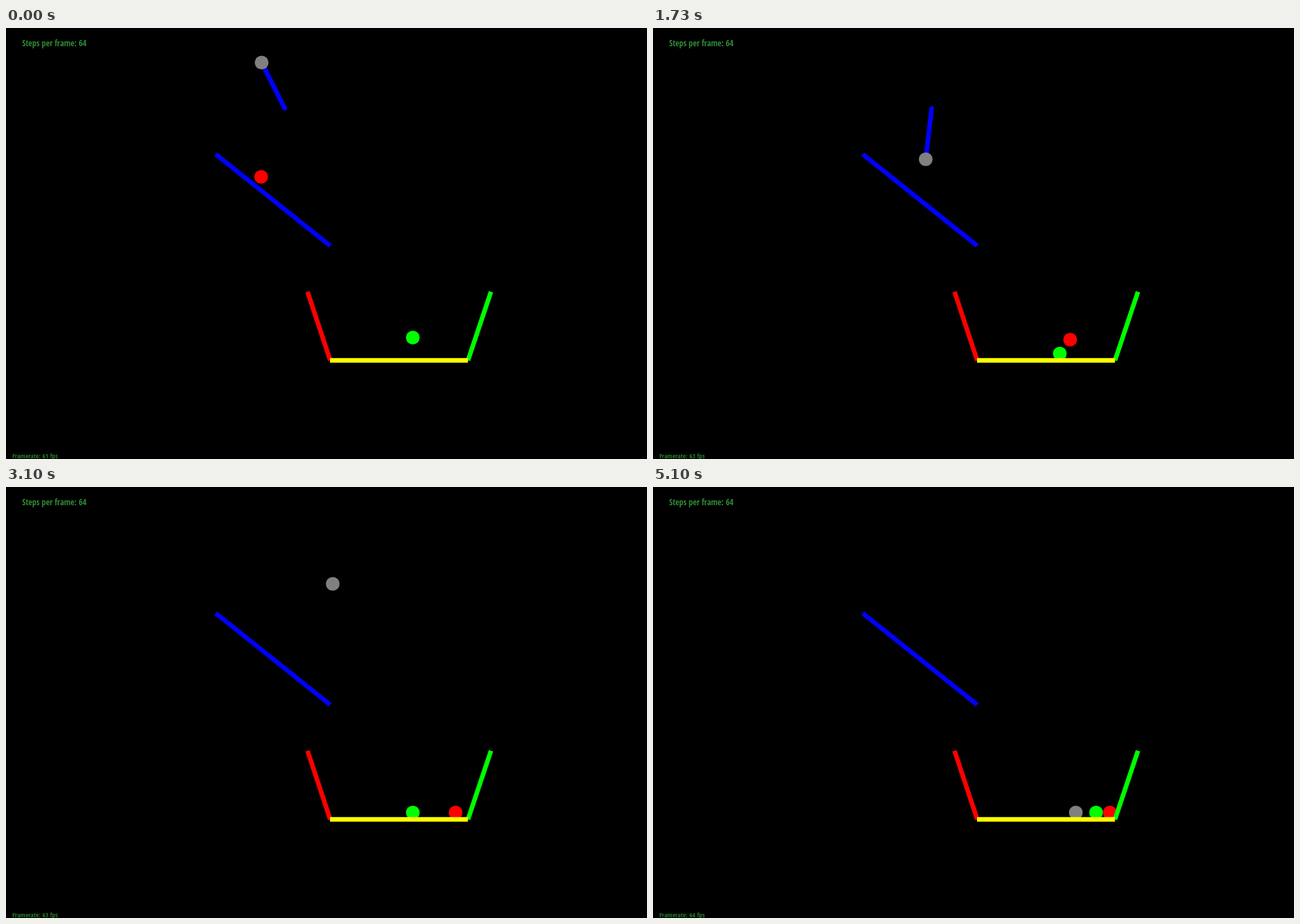
These frames come from a looping animation (912x614 px, 5130 ms). An HTML page:

```html
<!DOCTYPE html>
<html lang="en">
<head>
<meta charset="utf-8">
<title>Ball physics</title>
<style>
  html, body { margin: 0; width: 100%; height: 100%; overflow: hidden; background: #000; }
  svg { display: block; width: 912px; height: 614px; }
  line { stroke-width: 6.5; }
  text {
    font-family: "Open Sans Condensed", "Open Sans", "Noto Sans", sans-serif;
    font-stretch: 75%;
    font-weight: 700;
    fill: #2f8a35;
  }
  #steps { font-size: 12px; }
  #rate { font-size: 9.4px; fill: #2a7a2f; }
</style>
</head>
<body>
<svg viewBox="0 0 912 614">
  <rect width="912" height="614"/>
  <line id="rod" x1="396.5" y1="114.5" stroke="#00f" stroke-linecap="round"/>
  <circle id="gray" r="9.8" fill="#808080"/>
  <circle id="red" r="9.8" fill="#f00"/>
  <circle id="green" r="9.8" fill="#0f0"/>
  <line x1="298.3" y1="179.8" x2="461.3" y2="310.2" stroke="#00f"/>
  <line x1="429" y1="375.8" x2="461.3" y2="473.5" stroke="#f00"/>
  <line x1="657.3" y1="473.5" x2="690" y2="375.8" stroke="#0f0"/>
  <line x1="461" y1="473.5" x2="657.3" y2="473.5" stroke="#ff0"/>
  <text id="steps" x="23" y="26">Steps per frame: 64</text>
  <text id="rate" x="9" y="613">Framerate: 61 fps</text>
</svg>
<script>
const LOOP = 5130, FRAMES = 154;
const FLOOR = 463.7, DIAMETER = 19.6, GRAVITY = 320;
const PIVOT = [396.5, 114.5], ROD = 73, CUT = 2.9, HIT = 4.607;
const COS = 0.781, SIN = 0.625; // ramp direction

const $ = id => document.getElementById(id);

// time, angle from straight up, angular speed
const swing = [
  [0, 0.466, 0], [0.535, 0.675, 0.8], [1.07, 1.319, 1.7],
  [1.73, 3.025, 3.05], [2.53, 4.651, 0.25], [2.64, 4.668, 0], [CUT, 4.525, -0.9]
];

// time, frames per second
const rates = [[0, 61], [0.3, 62], [0.8, 63], [1.9, 62], [2.95, 63], [3.5, 61], [4.4, 64]];

const fly = (t, x, y, vx, vy) => [x + vx * t, y + vy * t + GRAVITY / 2 * t * t];
const slide = (s, x, y) => [x + COS * s, y + SIN * s];

function swingAngle(t) {
  let i = 1;
  while (i < swing.length - 1 && t > swing[i][0]) i++;
  const [t0, a, va] = swing[i - 1], [t1, b, vb] = swing[i];
  const h = t1 - t0, u = (t - t0) / h, w = 1 - u;
  return a * w * w * (1 + 2 * u) + b * u * u * (3 - 2 * u) + h * u * w * (va * w - vb * u);
}

function greenAt(t) {
  if (t < HIT) return [578.8, Math.min(FLOOR, 441 + GRAVITY / 2 * t * t)];
  const u = t - HIT;
  const x = u < 0.24 ? 578.8 + 170 * u : Math.min(630.4, 619.6 + 75 * (u - 0.24));
  return [x, FLOOR];
}

function redAt(t, green) {
  if (t < 1.157) {
    const drop = Math.min(5.8, 125 * t * t);
    return slide(103 * t * t, 363 - SIN * drop, 212 + COS * drop);
  }
  if (t < 1.787) return fly(t - 1.157, 467.1, 302.5, 220.6, 155.3);
  if (t < 2) return [606 + 206.6 * (t - 1.787), FLOOR];
  if (t < 2.38) {
    // short climb up the leaning wall
    const u = t - 2, d = 59 * u - 155 * u * u;
    return [650 + 0.316 * d, FLOOR - 0.949 * d];
  }
  return [Math.max(639 + 11 * Math.exp(-4 * (t - 2.38)), green[0] + DIAMETER), FLOOR];
}

function grayAt(t, green) {
  if (t < CUT) {
    const a = swingAngle(t);
    return [PIVOT[0] - ROD * Math.sin(a), PIVOT[1] - ROD * Math.cos(a)];
  }
  if (t < 3.853) return fly(t - CUT, 468.3, 128, -17.2, 17.8);
  if (t < 3.951) {
    const u = t - 3.853;
    return slide(189 * u + 100 * u * u, 451.9, 290.2);
  }
  if (t < HIT) return fly(t - 3.951, 467.1, 302.3, 160, 112.4);
  // slips off the green ball onto the floor
  const x = 571.9 + 80 * (1 - Math.exp(-1.6 * (t - HIT))) / 1.47;
  const dx = Math.min(DIAMETER, green[0] - x);
  return [x, FLOOR - Math.sqrt(DIAMETER * DIAMETER - dx * dx)];
}

function place(id, [x, y]) {
  $(id).setAttribute("cx", x);
  $(id).setAttribute("cy", y);
}

function draw(t) {
  const green = greenAt(t), gray = grayAt(t, green);
  place("green", green);
  place("red", redAt(t, green));
  place("gray", gray);
  const rod = $("rod");
  rod.setAttribute("x2", gray[0]);
  rod.setAttribute("y2", gray[1]);
  rod.style.display = t < CUT ? "" : "none";
  const fps = rates.filter(r => r[0] <= t).pop()[1];
  $("rate").textContent = `Framerate: ${fps} fps`;
}

const start = performance.now();

function tick() {
  const ms = (performance.now() - start) % LOOP;
  const frame = Math.min(FRAMES - 1, Math.floor((ms + 5) * 0.03));
  draw(Math.round(frame * 10 / 3) / 100);
  requestAnimationFrame(tick);
}
tick();
</script>
</body>
</html>
```
